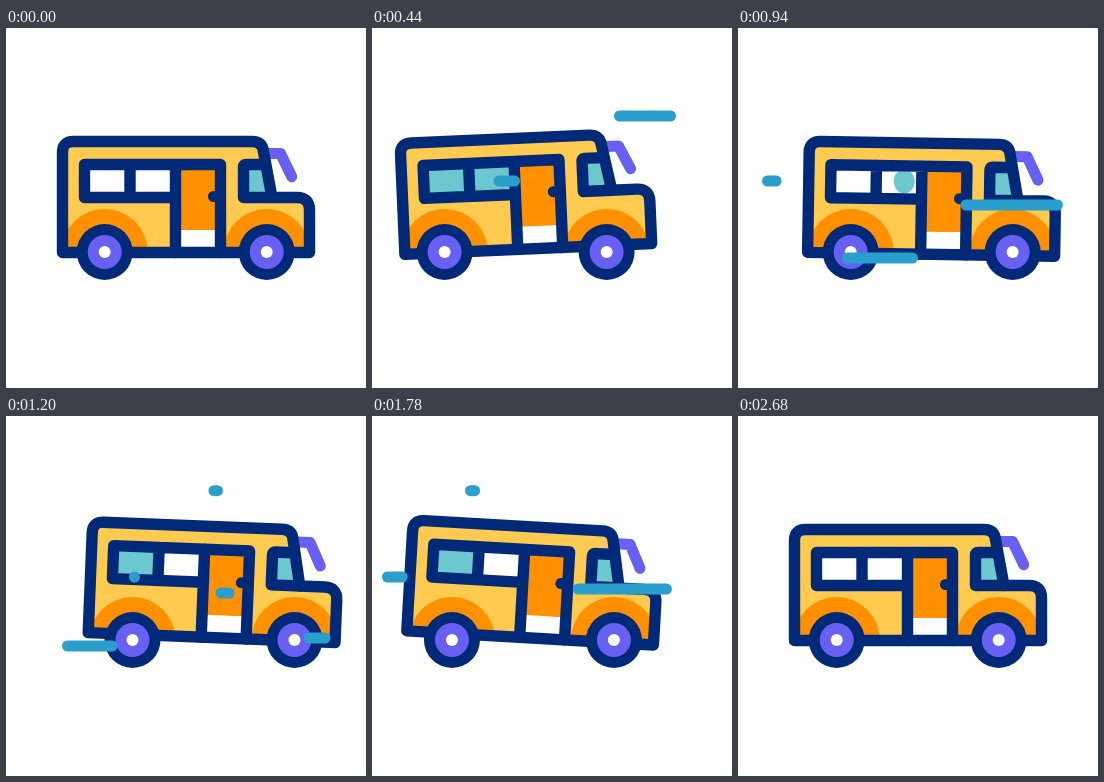
An HTML page for the animation above (3600 ms loop, 360x360 px).

```html
<!DOCTYPE html>
<html lang="en">
<head>
<meta charset="utf-8">
<title>Bus</title>
<style>
  html, body { margin: 0; width: 100%; height: 100%; overflow: hidden; background: #fff; }
  svg { display: block; width: 100%; height: 100%; }
  .ink { fill: none; stroke: #002a77; stroke-width: 11.4; stroke-linecap: round; stroke-linejoin: round; }
  .navy { fill: #002a77; }
  .yellow { fill: #ffca50; }
  .orange { fill: #ff9100; }
  .teal { fill: #6cc7ce; }
  .purple { fill: #6860f2; }
  .white { fill: #fff; }
  .mirror { fill: none; stroke: #6860f2; stroke-width: 11; stroke-linecap: round; stroke-linejoin: round; }
  #streaks line { stroke: #2b9fcb; stroke-width: 11; stroke-linecap: round; }
</style>
</head>
<body>
<svg viewBox="0 0 360 360">
  <defs>
    <path id="shell" d="M56.5 224.5V124.5Q56.5 113.5 67.5 113.5H246Q255 113.5 257 121L266 169.5H291Q303.5 169.5 303.5 182V224.5Z"/>
    <clipPath id="inside"><use href="#shell" class="sprung"/></clipPath>
    <clipPath id="pane"><rect x="129.5" y="142" width="34.5" height="22"/></clipPath>
    <g id="wheel">
      <circle class="navy" r="28"/>
      <circle class="purple" r="17"/>
      <circle class="white" r="6"/>
    </g>
  </defs>
  <rect class="white" width="360" height="360"/>
  <g class="sprung">
    <path class="mirror" d="M262 125.5H274.5L285.7 148.7"/>
    <use href="#shell" class="yellow"/>
  </g>
  <!-- The arches stay level with the wheels while the shell rocks -->
  <g clip-path="url(#inside)">
    <g class="rolling orange">
      <circle cx="98.7" cy="224" r="43"/>
      <circle cx="260.7" cy="224" r="43"/>
    </g>
  </g>
  <g class="sprung">
    <rect class="white" x="78.5" y="136.5" width="91" height="33"/>
    <rect class="teal" id="rearPane" x="78.5" y="136.5" width="45" height="33"/>
    <rect class="teal" id="midPane" x="124" y="136.5" width="45" height="33"/>
    <g clip-path="url(#pane)"><ellipse class="teal" id="glint" cx="152" rx="10.5"/></g>
    <rect class="orange" x="169.5" y="136.5" width="45" height="65.5"/>
    <rect class="white" x="169.5" y="202" width="45" height="22"/>
    <path class="teal" d="M237.5 136.5H260L266 169.5H237.5Z"/>
    <use href="#shell" class="ink"/>
    <path class="ink" d="M169.5 169.5H78.5V136.5H214.5V224.5M169.5 136.5V224.5M124 136.5V169.5M266 169.5H237.5V139Q237.5 136.5 240 136.5H258"/>
    <circle class="navy" cx="207.5" cy="168.5" r="5.5"/>
  </g>
  <g class="rolling">
    <use href="#wheel" x="98.7" y="224"/>
    <use href="#wheel" x="260.7" y="224"/>
  </g>
  <g id="streaks"></g>
</svg>
<script>
const LOOP = 3600;
const REACH = 113;
const $ = id => document.getElementById(id);
const sprung = document.querySelectorAll(".sprung");
const rolling = document.querySelectorAll(".rolling");

// [time, value]
const drive = [[0, 0], [555, -29], [1140, 29], [1745, -19], [2245, 0]];
const tilt = [[0, 0], [440, -2.5], [940, 0.9], [1440, 3.2], [1780, 3.3], [2020, 1.8], [2360, 0]];
const lift = [[0, 0], [440, -3.5], [940, 1.8], [1440, -7.2], [1780, -2.5], [2020, 0.4], [2360, 0]];

// [start time, right end, y]
const streaks = [
  [230, 298.5, 88], [332, 142.5, 153], [590, 328, 177], [694, 174.5, 230],
  [1090, 319, 222], [1150, 211.5, 74.7], [1195, 128.5, 161], [1390, 314.5, 173]
].map(([start, x, y]) => {
  const line = document.createElementNS("http://www.w3.org/2000/svg", "line");
  line.setAttribute("y1", y);
  line.setAttribute("y2", y);
  $("streaks").append(line);
  return { start, x, line };
});

const clamp = p => Math.min(1, Math.max(0, p));
const ease = p => (1 - Math.cos(Math.PI * clamp(p))) / 2;
const within = (t, from, to) => t >= from && t < to;
const show = (node, on) => node.setAttribute("visibility", on ? "visible" : "hidden");
const move = (nodes, transform) => nodes.forEach(n => n.setAttribute("transform", transform));

function eased(keys, t) {
  const i = keys.findIndex(k => k[0] > t);
  if (i < 0) return keys[keys.length - 1][1];
  const [t0, a] = keys[i - 1], [t1, b] = keys[i];
  return a + (b - a) * ease((t - t0) / (t1 - t0));
}

// Cubic Hermite through the keys, resting at both ends
function smooth(keys, t) {
  const i = keys.findIndex(k => k[0] > t);
  if (i < 0) return keys[keys.length - 1][1];
  const slope = n => n === 0 || n === keys.length - 1 ? 0 :
    (keys[n + 1][1] - keys[n - 1][1]) / (keys[n + 1][0] - keys[n - 1][0]);
  const [t0, a] = keys[i - 1], [t1, b] = keys[i];
  const d = t1 - t0, u = (t - t0) / d, v = 1 - u;
  return a * v * v * (1 + 2 * u) + b * u * u * (3 - 2 * u) +
    d * u * v * (v * slope(i - 1) - u * slope(i));
}

function render(t) {
  const x = eased(drive, t);
  move(sprung, `translate(${x} ${smooth(lift, t)}) rotate(${smooth(tilt, t)} 180 170)`);
  move(rolling, `translate(${x} 0)`);

  show($("rearPane"), within(t, 100, 760) || within(t, 1200, 1900));
  show($("midPane"), within(t, 100, 760));
  const late = t > 1500;
  show($("glint"), within(t, 760, 1100) || within(t, 1900, 2160));
  $("glint").setAttribute("cy", late ? 164 : 152);
  $("glint").setAttribute("ry", late ? 21 : 12);

  for (const { start, x, line } of streaks) {
    const age = t - start;
    show(line, within(age, 0, 680));
    line.setAttribute("x1", x - REACH * ease(age / 450));
    line.setAttribute("x2", x - REACH * ease((age - 280) / 400));
  }
}

const began = performance.now();
function tick() {
  render((performance.now() - began) % LOOP);
  requestAnimationFrame(tick);
}
tick();
</script>
</body>
</html>
```
